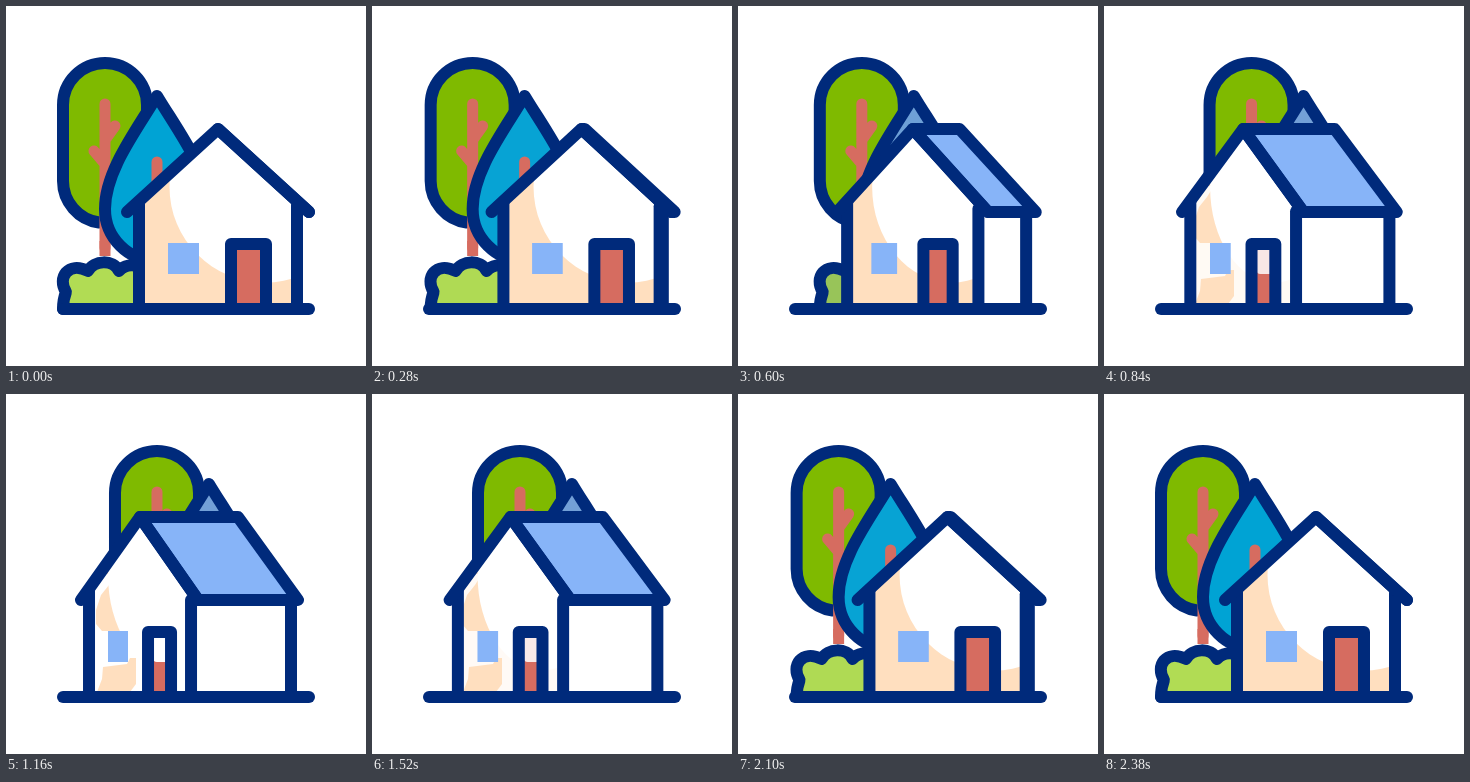
An HTML page with a canvas that plays this animation: 360x360 px, repeating every 2.4 s.

```html
<!DOCTYPE html>
<html lang="en">
<head>
<meta charset="utf-8">
<title>House turning</title>
<style>
  html, body { margin: 0; width: 100%; height: 100%; overflow: hidden; background: #fff; }
  canvas { display: block; width: 360px; height: 360px; }
</style>
</head>
<body>
<canvas id="stage" width="360" height="360"></canvas>
<script>
const ctx = document.getElementById('stage').getContext('2d');
const LOOP = 2400, TURN = 1190, SPAN = 1170;
const NAVY = '#002a7b', GREEN = '#7fba00', RED = '#d66c60',
      PEACH = '#ffdfbf', SKY = '#87b4f8', WHITE = '#fff';

const lerp = (a, b, p) => a + (b - a) * p;
const clamp = v => Math.min(1, Math.max(0, v));

// Symmetric ease, equal to cubic-bezier(.85, 0, .15, 1)
function ease(x) {
  let lo = 0, hi = 1, s = 0.5;
  for (let i = 0; i < 24; i++) {
    s = (lo + hi) / 2;
    const bx = 2.55 * s * (1 - s) ** 2 + 0.45 * s * s * (1 - s) + s ** 3;
    if (bx < x) lo = s; else hi = s;
  }
  return s * s * (3 - 2 * s);
}

function mix(a, b, p) {
  return `rgb(${a.map((v, i) => Math.round(lerp(v, b[i], p))).join(',')})`;
}

function poly(points, closed) {
  const path = new Path2D();
  points.forEach(([x, y], i) => i ? path.lineTo(x, y) : path.moveTo(x, y));
  if (closed) path.closePath();
  return path;
}

function fill(path, color) {
  ctx.fillStyle = color;
  ctx.fill(path);
}

function stroke(path, color = NAVY, width = 12) {
  ctx.strokeStyle = color;
  ctx.lineWidth = width;
  ctx.stroke(path);
}

const line = (...points) => stroke(poly(points));

const crown = new Path2D('M57 99A42 42 0 0 1 141 99V175A42 42 0 0 1 57 175Z');
const crownEdge = new Path2D('M141 140V99A42 42 0 0 0 57 99V175A42 42 0 0 0 93 216.5');
const trunk = new Path2D('M99 98V242M99 134L109 120M99 158L88 145');
const trunkFoot = new Path2D('M93.5 235H104.5V250H93.5Z');
const drop = new Path2D('M151 90C130 125 99 165 99 203A52 52 0 0 0 203 203C203 165 172 125 151 90Z');
const dropTrunk = new Path2D('M151 156V290');
const bush = new Path2D('M57 303C57 296 58 291 60 286C51 272 62 255 82 265C88 254 107 253 113 265C118 259 126 258 134 261V303Z');

function drawGarden(p) {
  ctx.save();
  ctx.translate(52 * p, 0);
  fill(crown, GREEN);
  stroke(crownEdge);
  stroke(trunk, RED, 11);
  fill(trunkFoot, RED);
  fill(drop, mix([0, 163, 212], [115, 160, 215], clamp(2 * p)));
  stroke(dropTrunk, RED, 11);
  stroke(drop);
  fill(bush, mix([177, 220, 84], [125, 170, 95], p));
  stroke(bush);
  ctx.restore();
}

function drawHouse(p) {
  const at = (a, b) => lerp(a, b, p);
  const left = at(133, 83), corner = at(291, 185), right = at(291, 285);
  const apex = at(212, 134), ridge = at(212, 232);
  const eaveL = at(121, 75), eaveM = at(303, 192), eaveR = at(303, 292);
  const top = 123, eave = 206, ground = 303;
  const worn = clamp((p - 0.6) / 0.4);

  fill(poly([[corner, eave], [right, eave], [right, ground], [corner, ground]], true), WHITE);

  // Front wall with a round highlight
  const front = poly([[left, ground], [left, 195], [apex, top], [corner, 195], [corner, ground]], true);
  fill(front, PEACH);
  ctx.save();
  ctx.clip(front);
  const light = new Path2D();
  light.ellipse(at(259, 164), 181, at(95.5, 62), 95.5, 0, 0, Math.PI * 2);
  light.rect(at(259, 164), 80, 120, 100);
  fill(light, WHITE);
  ctx.globalAlpha = worn;
  fill(poly([[80, 180], [110, 180], [103, 191], [95, 201], [90, 216], [90, 230], [96, 237],
    [114, 237], [124, 264], [121, 270], [97, 273], [96, 285], [91, 298], [80, 298]], true), WHITE);
  fill(poly([[112, 237], [145, 237], [190, 250], [190, 298], [124, 298], [130, 290], [130, 264], [121, 264]], true), WHITE);
  ctx.restore();

  const winL = at(162, 102), winR = at(193, 122);
  fill(poly([[winL, 237], [winR, 237], [winR, 268], [winL, 268]], true), SKY);

  const doorL = at(225, 142), doorR = at(260, 165);
  const door = [[doorL, ground], [doorL, 238], [doorR, 238], [doorR, ground]];
  fill(poly(door, true), RED);
  if (worn) {
    const glint = new Path2D();
    glint.roundRect(doorL + 5, 243, doorR - doorL - 7, 25, 4);
    ctx.globalAlpha = worn;
    fill(glint, WHITE);
    ctx.globalAlpha = 1;
  }
  line(...door);

  line([left, 196], [left, ground]);
  line([corner, eave - 6 * (1 - p)], [corner, ground]);
  line([right, eave - 6 * (1 - p)], [right, ground]);

  const roof = poly([[apex, top], [ridge, top], [eaveR, eave], [eaveM, eave]], true);
  fill(roof, SKY);
  stroke(roof);
  line([eaveL, eave], [apex, top], [eaveM, eave]);
}

function draw(now) {
  const t = now % LOOP;
  const p = ease(clamp(1 - Math.abs(t - TURN) / SPAN));
  ctx.fillStyle = WHITE;
  ctx.fillRect(0, 0, 360, 360);
  ctx.lineCap = ctx.lineJoin = 'round';
  drawGarden(p);
  drawHouse(p);
  line([57, 303], [303, 303]);
}

const start = performance.now();
function tick() {
  draw(performance.now() - start);
  requestAnimationFrame(tick);
}
tick();
</script>
</body>
</html>
```
